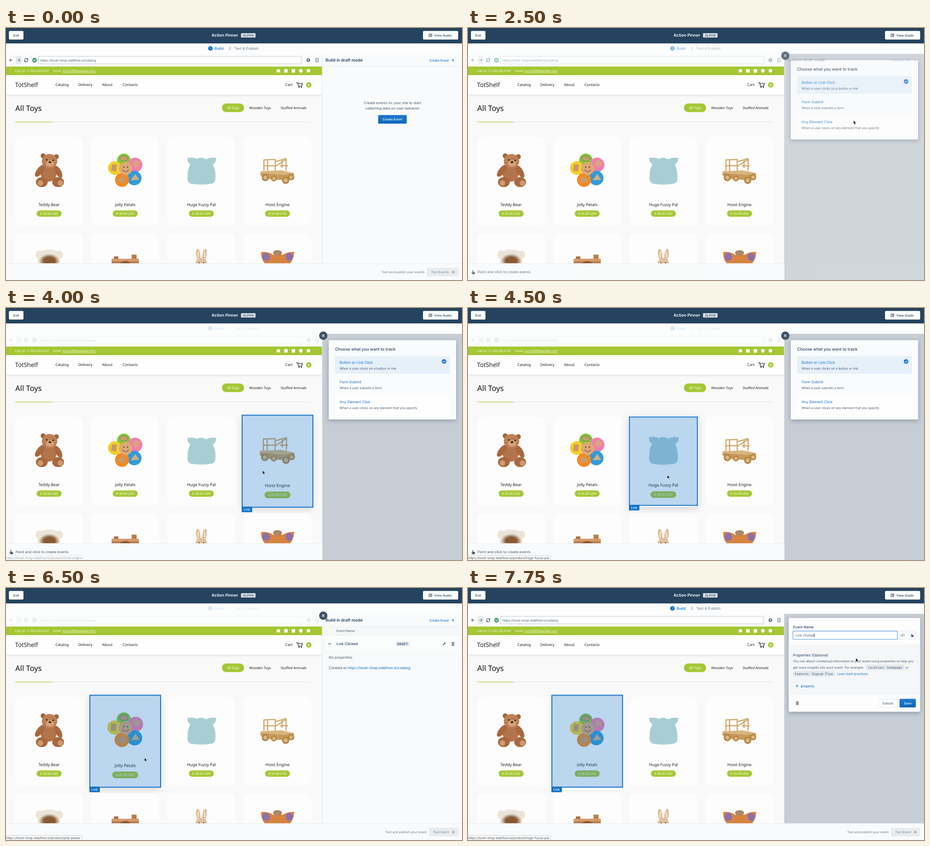
Animation, 1006 px wide and 556 px high, one loop 8 s. Source, as an HTML page:

```html
<!DOCTYPE html>
<html lang="en">
<head>
<meta charset="utf-8">
<title>Event builder</title>
<style>
  html, body { margin: 0; width: 100%; height: 100%; overflow: hidden; background: #fafbfc; }
  svg { display: block; width: 100vw; height: 100vh; }
  text { font-family: Inter, Roboto, sans-serif; text-rendering: geometricPrecision; white-space: pre; }
  .shop text { font-family: "Noto Sans", "Open Sans", sans-serif; }
  text.code { font-family: "DejaVu Sans Mono", monospace; }
  .mid { text-anchor: middle; }
  .end { text-anchor: end; }
  .med { font-weight: 500; }
  .semi { font-weight: 600; }
  .soft { filter: drop-shadow(0 .6px .7px rgba(0, 0, 0, .12)); }
  .lift { filter: drop-shadow(0 4px 7px rgba(0, 0, 0, .14)); }
  .float { filter: drop-shadow(0 3px 5px rgba(40, 60, 80, .35)); }
  .line { fill: none; stroke-width: 1.2; stroke-linecap: round; stroke-linejoin: round; }
</style>
</head>
<body>
<svg id="stage" viewBox="0 0 1006 556"></svg>
<script>
const NAVY = '#234361', INK = '#425a70', GREY = '#66788a', BLUE = '#1070ca', LIME = '#a5c734', BACK = '#c7cdd5';
const SHOP = 'https://tovel-shop.webflow.io/';
const LOOP = 8000;

// y is the middle of the capitals
const text = (x, y, str, size, fill = INK, cls = '', more = '') =>
  `<text x="${x}" y="${y + size * .36}" font-size="${size}" fill="${fill}" class="${cls}" ${more}>${str}</text>`;
const rect = (x, y, w, h, fill, r = 0, more = '') =>
  `<rect x="${x}" y="${y}" width="${w}" height="${h}" rx="${r}" fill="${fill}" ${more}/>`;
const oval = (x, y, rx, ry, fill, more = '') =>
  `<ellipse cx="${x}" cy="${y}" rx="${rx}" ry="${ry}" fill="${fill}" ${more}/>`;
const dot = (x, y, r, fill) => oval(x, y, r, r, fill);
const shape = (d, fill, more = '') => `<path d="${d}" fill="${fill}" ${more}/>`;
const line = (d, color, width = 1.2) => `<path d="${d}" class="line" style="stroke:${color};stroke-width:${width}"/>`;
const at = (x, y, body) => `<g transform="translate(${x} ${y})">${body}</g>`;
const group = (id, body, more = '') => `<g id="${id}" ${more}>${body}</g>`;

const icon = {
  arrow: (x, y, dir, color) => at(x, y, line(`M${-3 * dir} 0H${3 * dir}M${.4 * dir} -2.6L${3 * dir} 0L${.4 * dir} 2.6`, color)),
  plus: (x, y) => at(x, y, line('M-2.2 0H2.2M0 -2.2V2.2', BLUE)),
  trash: (x, y) => at(x, y, rect(-2.6, -2, 5.2, 6, GREY, .6) + line('M-3 -3H3M-1 -4H1', GREY, 1)
    + line('M-.9 -.5V2.5M.9 -.5V2.5', '#fff', .5)),
  hand: (x, y, k = 1) => at(x, y, `<g transform="scale(${k})">`
    + shape('M-1.6 -4.5q1 -.8 1.6 .2V-1l3.2 .6q1 .3 .8 1.4L3.2 4.5H-1.4L-4 .9q.2 -1 1.2 -.6l1.2 .9Z', INK) + '</g>'),
};

const toys = [
  // bear
  dot(-13, -30, 5.5, '#a2623e') + dot(16, -28, 5.5, '#a2623e') + oval(-1, 7, 18, 20, '#b4744b')
    + oval(-20, 3, 7, 16, '#a9683f', 'transform="rotate(38 -20 3)"') + oval(20, 5, 6.5, 15, '#a9683f', 'transform="rotate(-30 20 5)"')
    + oval(1, -18, 17, 16, '#bd7f56') + oval(2, -13, 9, 7, '#d4a37c') + oval(2, -16, 3, 2, '#3c261c')
    + dot(-5, -21, 1.7, '#2f1f18') + dot(9, -20, 1.7, '#2f1f18')
    + oval(-16, 28, 13, 11, '#a9683f') + oval(20, 28, 13, 11, '#a9683f') + oval(-19, 30, 6, 6, '#cf9a74') + oval(25, 30, 6, 6, '#cf9a74'),
  // flower
  dot(-3, -20, 15, '#86c63b') + dot(22, -10, 16, '#ee7fae') + dot(-23, -3, 15, '#f3cf26') + dot(20, 19, 16, '#2f9bd8')
    + dot(-7, 23, 15.5, '#f28a1f') + dot(1, -2, 14.5, '#dca878') + oval(-3, -24, 9, 6, '#c99a6b', 'stroke="#5b8f26"')
    + rect(-30, -11, 11, 15, '#c99a6b', 1, 'transform="rotate(8 -24 -4)"') + shape('M24 -21l8 5-2 9-10 1-4-8Z', '#d9a57c')
    + shape('M22 10l9 13-19 1Z', '#d3ae83') + rect(-15, 17, 15, 12, '#c99a6b', 1, 'transform="rotate(-20 -7 23)"')
    + dot(-3, -5, 1.3, '#4a2b1c') + dot(5, -5, 1.3, '#4a2b1c') + line('M-6 1Q1 9 8 1', '#a04a35', 1.2),
  // plush
  shape('M-31 -25Q-18 -28 -10 -23Q0 -29 11 -22Q20 -28 33 -25Q32 -13 25 -11Q32 2 31 18Q32 27 25 31Q0 36 -25 31Q-33 25 -30 14Q-31 0 -24 -11Q-31 -14 -31 -25Z', '#a8ced4'),
  // crane
  line('M-30 4V-21L-5 -22V4M-30 -8H-5M-22 -20V3M-5 -17L19 -24V2M19 -22L-3 -8M10 -20V-4M6 -8H22', '#cfa86b', 2.6)
    + shape('M-37 4L8 2L36 8V18L18 24L-28 20L-38 12Z', '#d8b57c') + shape('M-37 8L14 12L36 9V18L18 24L-28 20L-38 12Z', '#c69b5d')
    + [[-27, 18, 8], [-8, 20, 6.5], [18, 24, 8], [30, 17, 7]].map(([x, y, r]) => dot(x, y, r, '#b48646') + dot(x, y, r * .55, '#dbb97f')).join(''),
  // hooded doll
  shape('M-30 -19Q-28 -29 -18 -25Q0 -32 18 -25Q29 -28 31 -18Q31 -9 24 -8L25 14H-25L-24 -8Q-31 -10 -30 -19Z', 'url(#hood)'),
  // camera
  rect(-30, -8, 60, 30, '#b87c4c', 2) + rect(-25, -13, 10, 6, '#a96f40', 1) + rect(14, -17, 11, 10, '#b97e4b', 1)
    + rect(-30, -8, 60, 6, '#d19c6b', 2) + dot(0, 12, 15, '#8c5730') + dot(0, 12, 10, '#5e3820'),
  // rabbit
  oval(-7, -17, 4.5, 13, '#d9b88f', 'transform="rotate(-8 -7 -17)"') + oval(7, -17, 4.5, 13, '#d9b88f', 'transform="rotate(8 7 -17)"')
    + oval(-7, -17, 2, 9, '#f0dcc4') + oval(7, -17, 2, 9, '#f0dcc4') + oval(0, 4, 13, 14, '#dfc09a')
    + dot(-5, 1, 1.3, '#4d3a2c') + dot(5, 1, 1.3, '#4d3a2c'),
  // winged plush
  shape('M-36 -23Q-18 -24 -9 -16Q0 -29 10 -16Q22 -24 37 -23Q36 -4 25 5L20 16H-21L-26 5Q-37 -6 -36 -23Z', '#d6833f')
    + oval(-25, -12, 8, 9, '#8d6fb0') + oval(26, -12, 8, 9, '#8d6fb0') + oval(0, -21, 10, 6, '#a98a6b'),
];
const goods = [['Teddy Bear', 30], ['Jolly Petals', 38], ['Huge Fuzzy Pal', 38], ['Hoist Engine', 24]];
const cardX = i => 95 + 168 * (i % 4);

function card(toy, i) {
  const top = i < 4;
  const label = top ? text(0, 51.5, goods[i][0], 9, '#1d1d1d', 'mid med')
    + rect(-27.5, 64.5, 55, 14, LIME, 7) + text(0, 71.5, `$ ${goods[i][1]}.00 USD`, 7.05, '#fff', 'mid med') : '';
  return at(cardX(i), top ? 338 : 551, group('card' + i,
    rect(-75, -98, 150, 196, '#fdfdfd', 9, 'class="soft"') + at(0, top ? -26 : -34, toy) + label));
}

const header = rect(0, 0, 1006, 34, '#25435f')
  + rect(6.5, 6.5, 32, 19, '#fff', 2) + text(22.5, 16, 'Exit', 7.1, NAVY, 'mid med')
  + text(453.5, 16, 'Action Pinner', 9, '#fff', 'semi') + rect(518.5, 11.5, 32, 9.5, '#dfe6ec', 1.5)
  + text(534.7, 16.3, 'ALPHA', 7.1, INK, 'mid semi')
  + rect(920, 6.5, 77.5, 19, '#fff', 2) + text(945, 16, 'View Guide', 7, NAVY, 'med')
  + at(936.5, 16, line('M-3.2 -2.4L-1.2 -3.2L1.2 -2.4L3.2 -3.2V2.4L1.2 3.2L-1.2 2.4L-3.2 3.2ZM-1.2 -3V2.3M1.2 -2.3V3', NAVY, .9));

const toolbar = rect(0, 34, 1006, 23, '#fdfdfe') + rect(0, 57, 698, 28, '#fafbfc')
  + dot(451, 45, 5, BLUE) + text(451, 45, '1', 6, '#fff', 'mid') + text(460.5, 45, 'Build', 8.2, BLUE, 'med')
  + text(494, 45, '2', 8, GREY, 'mid') + text(503.5, 45, 'Test &amp; Publish', 8.1, GREY)
  + rect(21.5, 62, 13, 17.5, '#e6eaee', 1.5) + icon.arrow(11, 71, -1, INK) + icon.arrow(28, 71, 1, GREY)
  + at(44.5, 71, line('M-3.4 .8A3.5 3.5 0 0 1 2.6 -2.5M3.4 -.8A3.5 3.5 0 0 1 -2.6 2.5M3.4 -3.9V-1.6H1.2M-3.4 3.9V1.6H-1.2', INK, 1.1))
  + dot(63, 71, 5.2, '#479f78') + line('M60.7 71L62.4 72.7L65.4 69.6', '#fff')
  + rect(71.5, 62.5, 581, 16.5, '#fff', .5, 'stroke="#c1c9d1"') + text(76, 71, SHOP + 'catalog', 6.96, INK)
  + `<circle cx="667" cy="71" r="2.5" fill="none" stroke="${INK}" stroke-width="1.7"/>`
  + `<circle cx="667" cy="71" r="3.7" fill="none" stroke="${INK}" stroke-width="1.2" stroke-dasharray="1.4 1.5"/>`
  + rect(683.7, 67, 4.8, 8, 'none', 1, `stroke="${INK}" stroke-width="1.2"`);

const shop = rect(0, 85, 698, 434, '#f9f9f9')
  + rect(0, 104, 697.5, 43, '#fefefe', 0, 'style="filter:drop-shadow(0 1px 3px rgba(0,0,0,.13))"')
  + rect(0, 85, 697.5, 19, LIME)
  + text(20, 94.8, 'Call Us: +1 202 555-0147', 6.55, '#fff', 'med')
  + text(104, 94.8, 'Email: <tspan text-decoration="underline">our.shelf@example.com</tspan>', 6.55, '#fff', 'med')
  + dot(601, 94.5, 3.8, '#fff') + rect(613.8, 90.8, 7.4, 7.4, '#fff') + rect(630.3, 90.8, 7.4, 7.4, '#fff')
  + dot(650.5, 94.5, 3.9, '#fff') + rect(663.7, 91, 7, 7, '#fff')
  + text(20, 125.5, 'TotShelf', 13.3, '#222')
  + [[109, 'Catalog'], [159.5, 'Delivery'], [212, 'About'], [257, 'Contacts'], [616, 'Cart']]
    .map(([x, s]) => text(x, 125.5, s, 8.2, '#1b1b1b')).join('')
  + line('M640.5 120.5H643L645.8 128.5H652L654 122H643.6', '#111') + dot(646.5, 130.8, 1.3, '#111') + dot(651.7, 130.8, 1.3, '#111')
  + dot(668, 125.5, 6, LIME) + text(668, 125.5, '0', 7, '#fff', 'mid semi')
  + text(20.5, 177, 'All Toys', 16.8, '#111', 'med')
  + rect(476.3, 166.5, 49, 19, LIME, 9.5) + text(501, 176.3, 'All Toys', 7.7, '#fff', 'mid')
  + text(560.5, 176.3, 'Wooden Toys', 7.72, '#1b1b1b', 'mid') + text(634.5, 176.3, 'Stuffed Animals', 7.72, '#1b1b1b', 'mid')
  + rect(20, 207, 654, 1.1, '#dfdfdf') + rect(20, 207, 81, 1.1, LIME)
  + toys.map(card).join('');

const footer = rect(0, 519, 1006, 37, '#f9fafb') + rect(0, 519, 1006, .8, '#e1e5e9');
const testButton = (x, noun) => text(x - 5, 538.5, `Test and publish your ${noun.toLowerCase()}`, 7, GREY, 'end')
  + rect(x, 529, 997.5 - x, 19, '#e8ecf0', 2) + text(x + 9.3, 538.5, 'Test ' + noun, 7, '#8496a6', 'med')
  + icon.arrow(986, 538.5, 1, '#7e90a1');

const panel = rect(698, 57, 308, 462, '#f9fafb') + rect(697.2, 57, .8, 462, '#dfe3e8') + rect(698, 84.4, 308, .8, '#e4e8ec')
  + text(705, 71, 'Build in draft mode', 9.05, NAVY, 'semi') + text(934, 71, 'Create Event', 7, BLUE, 'med') + icon.plus(986, 71);

const empty = text(852.5, 165, 'Create events on your site to start', 7.9, INK, 'mid')
  + text(852.5, 177, 'collecting data on user behavior', 7.9, INK, 'mid')
  + rect(820.3, 191.3, 64.4, 20.4, 'none', 3, 'id="ring" stroke="#8fbce6" stroke-width="2"')
  + rect(821, 192, 63, 19, 'url(#blue)', 2, 'id="create"') + text(852.5, 201.5, 'Create Event', 7.05, '#fff', 'mid med')
  + testButton(928.5, 'Events');

const list = rect(698, 85, 308, 18.5, '#f5f7f9') + rect(698, 103.5, 308, .7, '#e4e8ec') + text(729, 94.5, 'Event Name', 7.1, INK)
  + rect(702.5, 108, 299.5, 83, '#fbfcfc', 2, 'class="soft"') + line('M711.5 121.8L714.3 124.6L717.1 121.8', INK)
  + text(729, 123, 'Link Clicked', 8.15, NAVY, 'med') + rect(860, 118.2, 30, 10, '#e1e6eb', 1.5) + text(875, 123.3, 'DRAFT', 7, INK, 'mid semi')
  + shape('M963.5 126.5L964.2 124L968.6 119.6L970.4 121.4L966 125.8Z', GREY) + icon.trash(986, 123.5)
  + rect(702.5, 137.5, 299.5, 53.5, '#f8f9fa') + text(712, 153.5, 'No properties.', 8, INK, '', 'font-style="italic"')
  + text(712, 176, `Created at <tspan fill="${BLUE}">${SHOP}catalog</tspan>`, 7.9, INK) + testButton(933, 'Event');

const choice = (y, title, note) => text(736, y, title, 8, BLUE) + text(736, y + 13, note, 7.05, INK);
const picker = rect(698, 57, 308, 499, BACK) + rect(0, 519.8, 698, 37, '#f9fafb')
  + icon.hand(11.5, 538.8) + text(21, 538.5, 'Point and click to create events', 7.93, INK)
  + rect(712, 71, 281, 175, '#fafbfc', 3, 'class="float"') + text(726, 91, 'Choose what you want to track', 9, NAVY, 'med')
  + rect(726, 106.5, 253, 38.5, '#e6f0f9', 2) + rect(726, 193.5, 253, 44, '#fefefe')
  + choice(120, 'Button or Link Click', 'When a user clicks on a button or link')
  + choice(163.5, 'Form Submit', 'When a user submits a form')
  + choice(207, 'Any Element Click', 'When a user clicks on any element that you specify')
  + dot(966.5, 118, 5, BLUE) + line('M964.3 118.2L966 119.8L968.8 116.5', '#fff');

const outlined = (x, y, w, h) => rect(x, y, w, h, '#fff', 2, 'stroke="#d3dae1" stroke-width=".8"');
const editor = rect(698, 57, 308, 462, BACK) + rect(707.5, 66, 290, 207, '#fdfdfe', 3, 'class="float"')
  + text(717, 86.5, 'Event Name', 7.9, NAVY, 'med')
  + rect(716.8, 95, 230.4, 18.4, '#fff', 1.5, 'stroke="#6fa9de" stroke-width="1.4"')
  + text(723, 104.3, 'Link Clicked', 7.1, INK) + rect(763.8, 99.5, .8, 9.5, '#222')
  + outlined(951.5, 95, 15, 18) + outlined(971.5, 95, 16, 18)
  + line('M956.8 102.2L954.8 104.2L956.8 106.2M961.2 102.2L963.2 104.2L961.2 106.2M959.8 101.3L958.2 107.1', INK, 1) + icon.hand(979.7, 104.3, .8)
  + rect(707.5, 125, 290, 110.5, '#f4f6f8') + text(717, 148, 'Properties (Optional)', 7.95, NAVY)
  + text(717, 161, 'You can attach contextual information to your event using properties to help you', 7.03, INK)
  + text(717, 175.2, 'get more insights into each event. For example:', 7.03, INK)
  + rect(878, 169, 85, 12, '#e4e8ec', 2) + text(882, 175.2, 'location: homepage', 7, INK, 'code') + text(965, 175.2, 'or', 7.03, INK)
  + rect(717, 183.2, 92.5, 12, '#e4e8ec', 2) + text(720.5, 189.5, 'feature: Signup Flow', 7, INK, 'code')
  + text(814, 189.5, 'Learn best practices', 7.05, BLUE) + icon.plus(726, 216) + text(734.5, 216, 'property', 7.2, BLUE, 'med')
  + icon.trash(726.5, 254) + outlined(905.5, 245, 41.5, 18.5) + text(926.3, 254, 'Cancel', 7.1, INK, 'mid med')
  + rect(952, 244.6, 36, 19, 'url(#blue)', 2) + text(970, 254, 'Save', 7.1, '#fff', 'mid med');

document.getElementById('stage').innerHTML = `<defs>
  <linearGradient id="blue" x2="0" y2="1"><stop stop-color="#1f7bce"/><stop offset="1" stop-color="#0c66b9"/></linearGradient>
  <radialGradient id="hood" cx=".5" cy=".6" r=".5"><stop offset=".4" stop-color="#8a5a34"/><stop offset=".75" stop-color="#ece4d8"/></radialGradient>
  <clipPath id="page"><path d="M0 85H697.5V519H0Z"/></clipPath></defs>`
  + header + toolbar + group('shop', shop, 'class="shop" clip-path="url(#page)"')
  + group('mark', rect(0, 0, 0, 0, 'rgba(16,112,202,.28)', 0, `id="frame" stroke="${BLUE}" stroke-width="2"`)
    + group('tag', rect(0, 0, 23, 12, BLUE) + text(11.5, 6, 'Link', 7.1, '#fff', 'mid med')))
  + footer + panel + group('empty', empty) + group('list', list)
  + group('dim', shape('M0 34H1006V57H698V85H0Z', '#fcfdfd')) + group('pick', picker) + group('edit', editor)
  + group('close', dot(700, 61, 9.2, '#3d546a') + line('M697.8 58.8L702.2 63.2M702.2 58.8L697.8 63.2', '#fff', 1.3))
  + group('status', rect(-4, 546, 0, 14, '#fbfbfb', 2, 'id="statusBox" stroke="#bfc3c7" stroke-width=".8"')
    + text(0, 551.6, '', 7, '#4c5258', '', 'id="statusText"'))
  + group('cursor', shape('M0 0V9L2 7.2L3.3 10L4.7 9.4L3.4 6.8H6.2Z', '#111', 'stroke="#fff" stroke-width=".7"'));

// Each step changes only what it names. mark: [card, half width, half height]
const steps = [
  [0, { cursor: null, button: 0, dim: 0, pick: 0, edit: 0, close: 0, empty: 1, list: 0, mark: null, hover: -1, zoom: 1, slug: '', status: 0 }],
  [500, { cursor: [924.5, 29.5] }],
  [750, { cursor: [944.5, 169.5] }],
  [1000, { cursor: [915.5, 220] }],
  [1750, { cursor: [868.5, 224] }],
  [2000, { cursor: [851, 204], button: 1 }],
  [2250, { cursor: [850.5, 203.5], button: 2 }],
  [2500, { pick: .8, dim: .5, close: .8, empty: 0 }],
  [2750, { pick: 1, dim: .84, close: 1 }],
  [3250, { cursor: [738.5, 211] }],
  [3500, { cursor: [698.5, 264.5] }],
  [3750, { cursor: [606, 338], mark: [3, 76, 98.5], hover: 3, zoom: 1.02 }],
  [4000, { cursor: [566, 358], mark: [3, 79, 102.5], zoom: 1.04, slug: 'hoist-engine', status: .5 }],
  [4250, { cursor: [535, 366], status: 1 }],
  [4500, { cursor: [439.5, 368], mark: [2, 76, 98.5], hover: 2, zoom: 1.03, slug: 'huge-fuzzy-pal' }],
  [4750, { mark: [2, 79, 102.5], zoom: 1.04 }],
  [5250, { cursor: [349, 374], mark: null, zoom: 1.02 }],
  [5500, { cursor: [322, 374], mark: [1, 76, 98.5], hover: 1, zoom: 1.02, slug: 'jolly-petals' }],
  [5750, { cursor: [305.5, 374], mark: [1, 77, 100.5], zoom: 1.04 }],
  [6500, { pick: 0, list: 1, mark: [1, 79, 102.5] }],
  [6750, { dim: 0, close: 0, edit: .7 }],
  [7000, { edit: 1 }],
  [7500, { cursor: [346, 352], zoom: 1.02 }],
  [7750, { cursor: [855.5, 154], hover: -1, slug: 'huge-fuzzy-pal' }],
];

const $ = id => document.getElementById(id);
const set = (id, attrs) => { for (const k in attrs) $(id).setAttribute(k, attrs[k]); };
const show = (id, value) => set(id, { opacity: +value, visibility: value ? 'visible' : 'hidden' });

function draw(s) {
  for (const id of ['dim', 'pick', 'edit', 'close', 'empty', 'list', 'status']) show(id, s[id]);
  show('ring', s.button === 2 && s.empty);
  set('create', { fill: s.button ? '#115a9f' : 'url(#blue)' });
  show('cursor', !!s.cursor);
  if (s.cursor) set('cursor', { transform: `translate(${s.cursor})` });
  for (let i = 0; i < 4; i++) {
    const on = s.hover === i;
    set('card' + i, { transform: `scale(${on ? s.zoom : 1})`, class: on ? 'lift' : '' });
  }
  show('mark', !!s.mark);
  if (s.mark) {
    const [i, w, h] = s.mark, x = cardX(i) - w, y = 338 - h;
    set('frame', { x: x + 1, y: y + 1, width: 2 * w - 2, height: 2 * h - 2 });
    set('tag', { transform: `translate(${x} ${y + 2 * h - 2})` });
  }
  $('statusText').textContent = s.slug && `${SHOP}product/${s.slug}`;
  set('statusBox', { width: $('statusText').getComputedTextLength() + 8 });
}

const start = performance.now();
let shown = -1;
function tick() {
  const time = (performance.now() - start) % LOOP;
  const count = steps.filter(([from]) => from <= time).length;
  if (count !== shown) draw(Object.assign({}, ...steps.slice(0, shown = count).map(step => step[1])));
  requestAnimationFrame(tick);
}
tick();
</script>
</body>
</html>
```
